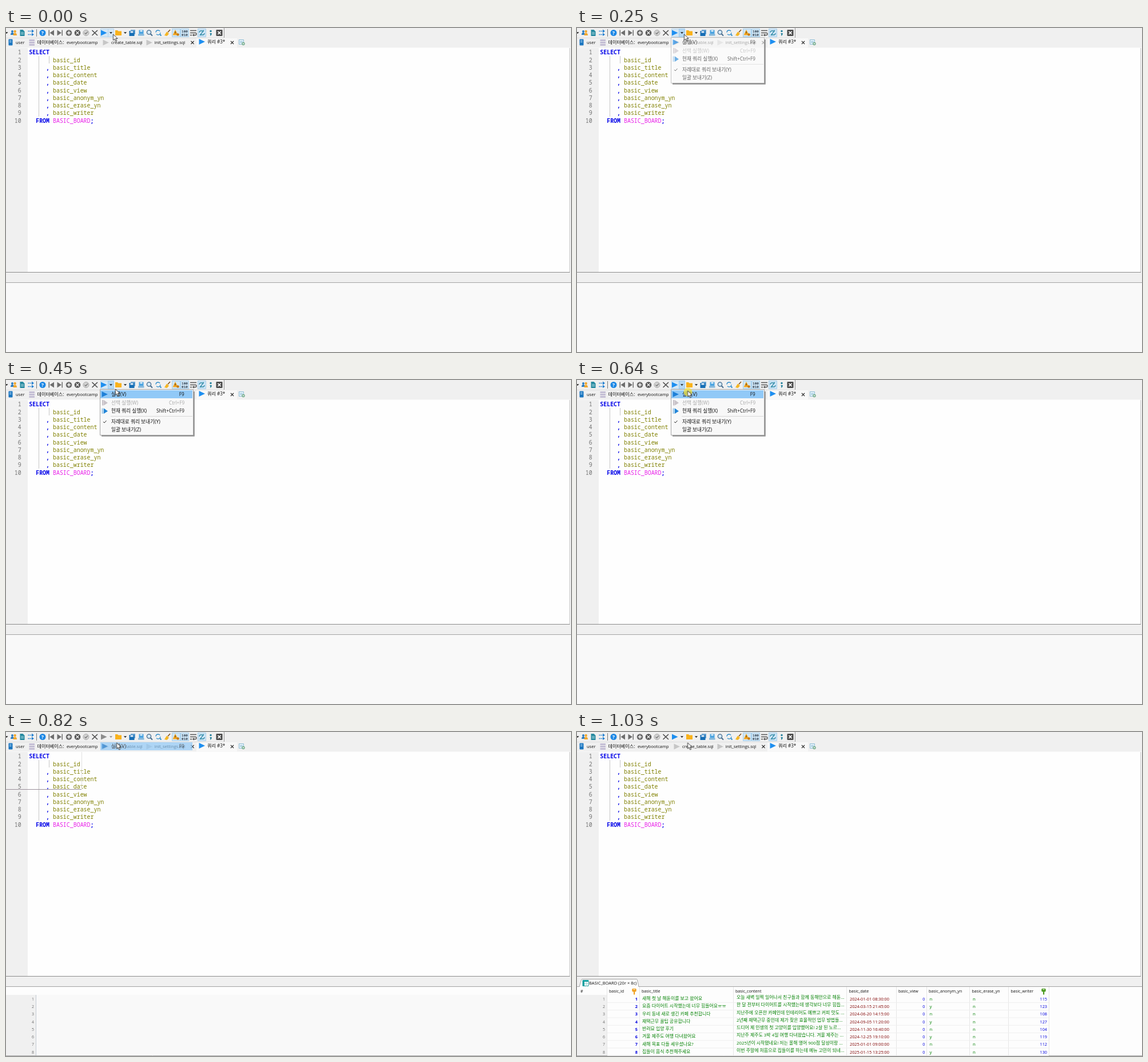
Write an HTML page that moves like this. It is 988 by 567 pixels and loops after 1.48 s.

```html
<!DOCTYPE html>
<html lang="ko">
<head>
<meta charset="utf-8">
<title>Query run</title>
<style>
html, body { margin: 0; width: 100%; height: 100%; overflow: hidden; background: #f0f0f0; }
svg { display: block; width: 988px; height: 567px; }
text { font: 7.5px "Open Sans", "Noto Sans CJK KR", "Noto Sans CJK", sans-serif; fill: #111; }
.code text { font: 9.93px "Noto Sans Mono", monospace; }
.code .kw { fill: #0000e8; font-weight: 700; }
.code .col { fill: #808000; }
.code .tbl { fill: #e81ee8; }
.code .num { fill: #737373; }
.end { text-anchor: end; }
.mid { text-anchor: middle; }
.off { fill: #a8a8a8; }
.head { font-size: 7.1px; }
.str { font-size: 7.93px; fill: #008000; }
.date { font-size: 7.3px; fill: #800000; }
.int { font-size: 7.3px; fill: #0000e0; }
.key { font-size: 7.3px; fill: #0000e0; font-weight: 700; }
.row { font-size: 7px; fill: #6d6d6d; }
.ko { font-size: 8.1px; }
.item { font-size: 8.65px; }
.short { font-size: 8.2px; }

/* 1480 ms loop */
.menu, .pick, .cursor, .click { animation: 1480ms linear infinite; }
.hover, .press, .shade, .ready, .busy, .grid, .ghost, .data { animation: 1480ms step-end infinite; }
.menu { animation-name: menu; }
.pick { animation-name: pick; }
.cursor { animation-name: cursor; }
.click { animation-name: click; transform-origin: 194px 21px; }
.hover { animation-name: hover; }
.press { animation-name: press; }
.shade { animation-name: shade; }
.ready { animation-name: ready; }
.busy { animation-name: busy; }
.grid { animation-name: grid; }
.ghost { animation-name: ghost; }
.data { animation-name: data; }
@keyframes menu { 0%, 4.73% { opacity: 0 } 23.65%, 49.99% { opacity: 1 } 50%, 100% { opacity: 0 } }
@keyframes pick { 0%, 27.69% { opacity: 0 } 27.7%, 50% { opacity: 1 } 68.24%, 100% { opacity: 0 } }
@keyframes cursor { 0%, 23.65% { transform: translate(187.5px, 11px) } 34.46%, 100% { transform: translate(193.5px, 18.7px) } }
@keyframes click {
  0%, 39.18% { opacity: 0; transform: scale(.5) } 39.19% { opacity: .7; transform: scale(.6) }
  43.24%, 48.64% { opacity: .7; transform: none } 48.65%, 100% { opacity: 0 }
}
@keyframes hover { 0% { opacity: 1 } 50%, 100% { opacity: 0 } }
@keyframes press { 0% { opacity: 0 } 2.03% { opacity: 1 } 50%, 100% { opacity: 0 } }
@keyframes shade { 0% { opacity: 0 } 4.73% { opacity: 1 } 50%, 100% { opacity: 0 } }
@keyframes ready { 0% { opacity: 1 } 50% { opacity: 0 } 64.86%, 100% { opacity: 1 } }
@keyframes busy { 0% { opacity: 0 } 50% { opacity: 1 } 64.86%, 100% { opacity: 0 } }
@keyframes grid { 0% { opacity: 0 } 52.7%, 100% { opacity: 1 } }
@keyframes ghost { 0% { opacity: 0 } 54.73% { opacity: 1 } 58.78%, 100% { opacity: 0 } }
@keyframes data { 0% { opacity: 0 } 58.78%, 100% { opacity: 1 } }
</style>
</head>
<body>
<svg viewBox="0 0 988 567">
  <defs>
    <path id="play" d="M-5-5 5.5 0-5 5z"/>
    <path id="drop" d="M-2.6-1.2h5.2L0 1.6z"/>
    <path id="cross" d="M-2.6-2.6 2.6 2.6M2.6-2.6-2.6 2.6" fill="none"/>
    <g id="keyIcon"><rect x="-3.7" y="-5" width="7.4" height="5.6" rx="1.6"/><path d="M-1 0h2.2v5.5H-1z"/><path d="M-1.5-3.4h3" stroke="#fff"/></g>
  </defs>

  <rect width="988" height="567" fill="#f0f0f0"/>
  <!-- editor -->
  <rect x="38" y="35" width="948" height="392" fill="#fefefe"/>
  <path d="M0 34.5h988" stroke="#f8f8f8"/>
  <path d="M985.5 35v392" stroke="#cfcfcf"/>
  <path d="M0 427.5h986" stroke="#8c8c8c"/>
  <path d="M57.5 49v106M75.5 49v13" stroke="#c6c6c6"/>
  <g class="code" id="code"></g>
  <g class="ghost" fill="none"><path d="M132.5 35v65" stroke="#e2e2e2"/><path d="M0 100.5h132" stroke="#9a8f9a"/></g>

  <!-- result pane -->
  <rect y="446" width="988" height="121" fill="#f9f9f9"/>
  <path d="M0 445.5h988" stroke="#a3a3a3"/>
  <g class="grid">
    <rect y="446" width="988" height="14" fill="#fdfdfd"/>
    <rect y="460" width="52" height="106" fill="#f0f0f0"/>
    <path d="M52.5 460v106" stroke="#c4ccd4"/>
    <path d="M0 566.5h988" stroke="#a8a8a8"/>
    <g id="rows"></g>
  </g>
  <g class="data">
    <rect x="53" y="446" width="935" height="120" fill="#fdfdfd"/>
    <path d="M4 446 7.5 433.5Q8 432.5 9 432.5H104Q105 432.5 105.3 433.5L108 446" fill="#fdfdfd" stroke="#a3a3a3"/>
    <g><path d="M10 434.5h10v10H10z" fill="#fff" stroke="#1b9c9c"/><path d="M10 434h10v3H10zM10 437h3v8h-3z" fill="#14a0a0"/><path d="M13 440.5h7M16.5 437v8" stroke="#8ccaca" stroke-width=".8"/></g>
    <g id="table"></g>
    <use href="#keyIcon" x="100" y="454" fill="#f0a020"/>
    <use href="#keyIcon" x="816" y="454" fill="#4c9a20"/>
  </g>

  <!-- toolbar -->
  <path d="M53.5 2v13" stroke="#777"/>
  <path d="M381.5 0v17" stroke="#9a9a9a"/>
  <path d="M0 17.5h381" stroke="#dedede"/>
  <use href="#drop" x="1" y="8.5" fill="#222"/>
  <g><circle cx="11" cy="6" r="2" fill="#2b7cc4"/><path d="M8 12q0-4 3-4t3 4z" fill="#2b7cc4"/><circle cx="15.7" cy="6" r="2.2" fill="#f0a830"/><path d="M12.5 13q0-4.6 3.2-4.6T19 13z" fill="#f0a830"/></g>
  <path d="M24.5 3h5l3 3v8h-8z" fill="#278aa0"/><path d="M26 8h5M26 10.5h5" stroke="#bfe2e8"/>
  <path d="M38.500 5.500h8M38.500 11.500h8" stroke="#2480d0" stroke-width="1.500" stroke-dasharray="2 1"/><path d="M45 2.500 49 5.500 45 8.500z M45 8.500 49 11.500 45 14z" fill="#2480d0"/>
  <circle cx="64" cy="8.500" r="5.500" fill="#1e88e5"/>
  <g fill="#6e6e6e"><path d="M74.500 3.500H76v10h-1.500zM84 3.500v10l-7.500-5z"/><path d="M97.500 3.500H99v10h-1.500zM89.500 3.500v10l7.500-5z"/><circle cx="110" cy="8.500" r="5.300"/><circle cx="125" cy="8.500" r="5.300" fill="#555"/></g>
  <path d="M107 8.500h6M110 5.500v6" stroke="#fff" stroke-width="1.500"/>
  <use href="#cross" x="125" y="8.500" stroke="#fff" stroke-width="1.300" />
  <circle cx="140" cy="8.500" r="5" fill="#d2d2d2" stroke="#a8a8a8"/><path d="m137.500 8.500 2 2 3.300-4" fill="none" stroke="#777" stroke-width="1.200"/>
  <path d="m150.500 4 9.500 9m0-9-9.500 9" stroke="#505050" stroke-width="1.700"/>
  <g class="hover"><path d="M165.500 1.500h23v14h-23zM178.500 1.500v14" fill="#d5e7f5" stroke="#b5d5ee"/></g>
  <path class="press" d="M178.500 1.500h10v14h-10z" fill="#b5d8f3" stroke="#9ccbee"/>
  <g class="ready"><use href="#play" x="171" y="8.500" fill="#1e8ff0"/><use href="#drop" x="183.500" y="8.500" fill="#222"/></g>
  <g class="busy"><use href="#play" x="171" y="8.500" fill="#8c8c8c"/><use href="#drop" x="183.500" y="8.500" fill="#8c8c8c"/></g>
  <path d="M191 4h4l1.500 1.500h5.500v7.500h-11z" fill="#f9b21c"/><use href="#drop" x="208.500" y="8.500" fill="#222"/>
  <path d="M218 3h8v8h-8z" fill="#6da6d5"/><path d="M215.500 5h9v9h-9z" fill="#176eb5"/><path d="M217.500 5.500h5v3h-5z" fill="#dceaf6"/>
  <path d="M232.500 3.500h8v7h-8z" fill="#4ba3e0"/><path d="M231 10.500h10.500v3H231z" fill="#7fb5da"/><path d="M234.500 4h4v2.500h-4z" fill="#d8ecf9"/>
  <g fill="#d4e9f8" stroke="#42688a" stroke-width="1.300"><circle cx="250" cy="7.500" r="3.600"/><path d="m252.700 10.300 3.300 3.300" stroke-width="2"/></g>
  <g fill="none" stroke="#2f8dcc" stroke-width="1.300"><circle cx="266" cy="8" r="4" stroke-dasharray="9.500 3"/><path d="m269 11 2.500 2.500" stroke-width="2"/></g>
  <path d="m287 3-4 4.500" stroke="#8b5c26" stroke-width="1.800"/><path d="m281 6.500 4 3.500-3.500 4-4.500-1z" fill="#f5b623"/>
  <g fill="#cfe5f5" stroke="#a6cfec"><path d="M290.500 1.500h14v14h-14zM305.500 1.500h14v14h-14zM335.500 1.500h14v14h-14z"/></g>
  <path d="m296 3 5 9.500h-9.500z" fill="#f6a51b"/><path d="M296 6v3.500" stroke="#333"/><circle cx="300.500" cy="11.500" r="2.300" fill="#c57b18"/>
  <path d="M322 4.500h11M322 8.500h9q2 0 2 2t-2 2h-3M322 12.500h3" fill="none" stroke="#555" stroke-width="1.400"/><path d="m329 10-3.500 2.500 3.500 2z" fill="#555"/>
  <path d="M338 8q0-3 3-3h5M347 9q0 3-3 3h-5M346 4l-7 9" fill="none" stroke="#328ca8" stroke-width="1.300"/>
  <g fill="#23809c"><circle cx="358" cy="5.500" r="1.700"/><path d="M356.400 9h3.400q0 4-3 5 1-2 .4-2.500z"/></g>
  <rect x="367.500" y="3" width="11" height="11" rx="1" fill="#4b4b4b"/><use href="#cross" x="373" y="8.500" stroke="#fff" stroke-width="1.500"/>

  <!-- tabs -->
  <path d="M333 35V18h71v17z" fill="#f8f8f8"/>
  <rect x="4.500" y="19.500" width="7" height="11" rx="1" fill="#1c76c0"/><path d="M6 22h3.500M6 24.500h3.500" stroke="#bfe0f7"/>
  <path d="M40.500 20h9.500v3h-9.500zM40.500 24h9.500v3h-9.500zM40.500 28h9.500v3h-9.500z" fill="#c3bdd4"/>
  <use href="#play" x="174.500" y="25.500" fill="#c6c6c6"/><use href="#play" x="250.500" y="25.500" fill="#c6c6c6"/>
  <use href="#play" x="342.500" y="24" fill="#1e8ff0"/>
  <g stroke="#222" stroke-width="1.200"><use href="#cross" x="326" y="25.500"/><use href="#cross" x="395.500" y="25.500"/></g>
  <path d="M407.500 20.500h8v8h-8z" fill="#e6f3fa" stroke="#8fbdd6"/><path d="M409 23.500h5M409 25.500h4" stroke="#8fbdd6"/><circle cx="415" cy="27.500" r="2.700" fill="#6ea886"/><path d="M413.500 27.500h3M415 26v3" stroke="#fff" stroke-width=".8"/>
  <g id="labels"></g>

  <!-- menu -->
  <path class="shade" d="M328.500 20v77.500H167" fill="none" stroke="#8d8d8d" stroke-width="2.500"/>
  <g class="menu">
    <path d="M164.500 16.500h163v80h-163z" fill="#f8f8f8" stroke="#a5a5a5"/>
    <path d="M183 63.500h143" stroke="#d7d7d7"/>
    <use href="#play" x="172.500" y="25" fill="#1e8ff0"/>
    <path d="M168 35h2.500v9.500H168zM171 35l7 5-7 4.500z" fill="#c8c2c8"/>
    <path d="M167.500 49.500h3v9.500h-3z" fill="#a5cdea"/><path d="m171 49.500 7 5-7 4.500z" fill="#2185d8"/>
    <path d="m170 73 2 2 3.500-4" fill="none" stroke="#333"/>
    <g id="items"></g>
  </g>
  <g class="pick">
    <path d="M165 18h161v14H165z" fill="#91c9f7"/>
    <use href="#play" x="172.500" y="25" fill="#1e80d8"/>
    <g id="picked"></g>
  </g>

  <circle class="click" cx="194" cy="21" r="7.500" fill="#f5e330"/>
  <g class="cursor"><path d="M0 0v10.500l2.400-2.300 1.800 4 1.900-.8-1.800-3.900h3.300z" fill="#fff" stroke="#222" stroke-width=".9"/></g>
</svg>
<script>
const $ = id => document.getElementById(id);
const text = (x, y, s, cls = '') => `<text x="${x}" y="${y}" class="${cls}">${s}</text>`;
const line = (d, color) => `<path d="${d}" stroke="${color}" fill="none"/>`;
const PITCH = 13.25;

// SQL listing
const columns = ['id', 'title', 'content', 'date', 'view', 'anonym_yn', 'erase_yn', 'writer'];
const names = columns.map(c => 'basic_' + c);
const codeX = col => 40.3 + col * 5.96;
const codeY = row => 46.3 + row * PITCH;
let code = text(codeX(0), codeY(0), 'SELECT', 'kw');
names.forEach((name, i) => {
  if (i) code += text(codeX(5), codeY(i + 1), ',', 'kw');
  code += text(codeX(7), codeY(i + 1), name, 'col');
});
code += text(codeX(2), codeY(9), 'FROM', 'kw')
  + text(codeX(7), codeY(9), 'BASIC_BOARD', 'tbl')
  + text(codeX(18), codeY(9), ';', 'kw');
for (let i = 0; i < 10; i++) code += text(26.7, codeY(i), i + 1, 'num end');
$('code').innerHTML = code;

// Toolbar and tab captions
$('labels').innerHTML = text(17, 28, 'user')
  + text(54.5, 28, '데이터베이스:', 'ko') + text(106, 28, 'everybootcamp')
  + text(184, 28, 'create_table.sql') + text(259.5, 28, 'init_settings.sql')
  + text(352, 27, '쿼리 #3*', 'ko')
  + '<g font-weight="700">'
  + '<text x="64" y="11.8" class="mid" style="font-weight:700;font-size:9px;fill:#fff">?</text>'
  + ['100', '010'].map((s, i) =>
    `<text x="312.500" y="${8 + i * 6}" class="mid" style="font:700 6px 'Noto Sans Mono',monospace;fill:#345">${s}</text>`).join('')
  + '</g>';

const item = (y, label, key = '', keyX = 0, off = '') =>
  text(184, y, label, 'item ' + off) + text(keyX, y, key, 'short ' + off);
const run = item(28, '실행(V)', 'F9', 302.8);
$('picked').innerHTML = run;
$('items').innerHTML = run
  + item(42.7, '선택 실행(W)', 'Ctrl+F9', 285, 'off')
  + item(57.2, '현재 쿼리 실행(X)', 'Shift+Ctrl+F9', 263)
  + item(75.7, '자례대로 쿼리 보내기(Y)')
  + item(90.2, '일괄 보내기(Z)');

// Result table
const posts = [
  ['새해 첫 날 해돋이를 보고 왔어요', '오늘 새벽 일찍 일어나서 친구들과 함께 동해안으로 해돋...', '2024-01-01 08:30:00', 115],
  ['요즘 다이어트 시작했는데 너무 힘들어요ㅠㅠ', '한 달 전부터 다이어트를 시작했는데 생각보다 너무 힘듭...', '2024-03-15 21:45:00', 123],
  ['우리 동네 새로 생긴 카페 추천합니다', '지난주에 오픈한 카페인데 인테리어도 예쁘고 커피 맛도 ...', '2024-06-20 14:15:00', 108],
  ['재택근무 꿀팁 공유합니다', '2년째 재택근무 중인데 제가 찾은 효율적인 업무 방법들...', '2024-09-05 11:20:00', 127],
  ['반려묘 입양 후기', '드디어 제 인생의 첫 고양이를 입양했어요! 2살 된 노르...', '2024-11-30 16:40:00', 104],
  ['겨울 제주도 여행 다녀왔어요', '지난주 제주도 3박 4일 여행 다녀왔습니다. 겨울 제주는 ...', '2024-12-25 19:10:00', 119],
  ['새해 목표 다들 세우셨나요?', '2025년이 시작됐네요! 저는 올해 영어 900점 달성이랑 ...', '2025-01-01 09:00:00', 112],
  ['집들이 음식 추천해주세요', '이번 주말에 처음으로 집들이를 하는데 메뉴 고민이 되네...', '2025-01-15 13:25:00', 130],
];
const headX = [56, 113, 277, 475.5, 562, 615, 690.5, 758.5];
const edges = [52.5, 109.5, 273.5, 471.5, 558.5, 611.5, 686.5, 754.5, 825.5];
const rowY = i => 469.8 + i * PITCH;

let table = edges.map(x => line(`M${x} 446V566`, '#e6e6e6')).join('');
table += text(6, 456, '#', 'head') + names.map((n, i) => text(headX[i], 456, n, 'head')).join('');
let rows = '';
posts.forEach(([title, content, date, writer], i) => {
  const y = rowY(i);
  rows += text(49, y, i + 1, 'row end');
  table += line(`M53 ${y + 3.7}H825`, '#efefef')
    + text(106, y, i + 1, 'key end')
    + text(114, y - .8, title, 'str')
    + text(279, y - 2.6, content, 'str')
    + text(477, y, date, 'date')
    + text(608.5, y, 0, 'int end')
    + text(616.5, y, i % 2 ? 'y' : 'n', 'str')
    + text(692, y, 'n', 'str')
    + text(822, y, writer, 'int end');
});
$('rows').innerHTML = rows;
$('table').innerHTML = table + text(21, 442, 'BASIC_BOARD (20r × 8c)');
</script>
</body>
</html>
```
